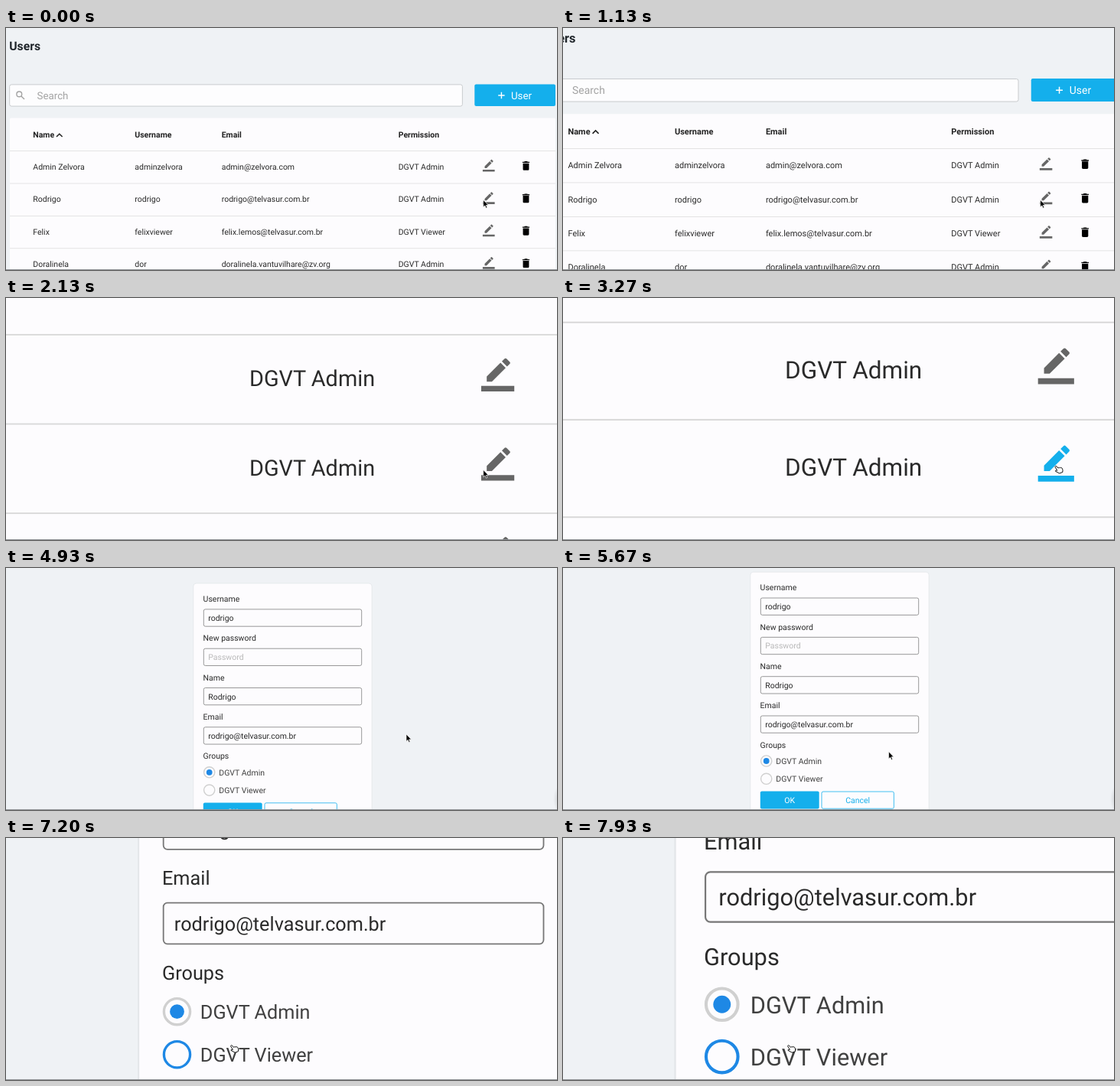
Write an HTML page that moves like this. It is 720 by 316 pixels and loops after 8000 ms.

```html
<!DOCTYPE html>
<html lang="en">
<head>
<meta charset="utf-8">
<title>Edit a user's group</title>
<style>
  html, body { margin: 0; width: 100%; height: 100%; overflow: hidden; background: #eff2f5; }
  svg { display: block; }
  text { font: 10.5px Roboto, sans-serif; fill: #2a2a2a; text-rendering: geometricPrecision; white-space: pre; }
  .title { font-size: 15.75px; font-weight: 700; fill: #20262b; }
  .head { font-weight: 700; fill: #222; }
  .big { font-size: 13.3px; }
  .hint { fill: #a3a3a3; }
  .faint { fill: #b9b9b9; }
  .option { fill: #404040; }
  .mid { text-anchor: middle; }
  .white { fill: #fff; }
  .blue { fill: #14afec; }
  .panel { fill: #fdfcfe; }
  .field { fill: #fdfcfe; stroke: #777; stroke-width: .75; }
  .pen { fill: #666; }
  .hover .pen { fill: #14afec; }
  .ring { fill: #fdfcfe; stroke: #d0d0d0; stroke-width: 1.4; }
  .hover .ring { stroke: #1e88e5; }
</style>
</head>
<body>
<svg id="stage" width="720" height="316">
  <defs>
    <radialGradient id="smudge">
      <stop offset="0" stop-opacity=".16"/>
      <stop offset="1" stop-opacity="0"/>
    </radialGradient>
  </defs>
  <rect width="720" height="316" fill="#eff2f5"/>
  <g id="list"></g>
  <g id="edit">
    <g id="page"></g>
    <ellipse id="corner" cx="724" cy="302" rx="9" ry="18" fill="url(#smudge)"/>
  </g>
  <rect y="315" width="720" height="1" fill="#8f9295"/>
  <g id="arrow">
    <path d="M0 0V9.4L2.1 7.5L3.6 10.8L5.1 10.1L3.7 6.9H6.6Z" fill="#000" stroke="#fff" stroke-width=".7"/>
  </g>
  <g id="hand">
    <path transform="rotate(-20)" d="M-1.1 .8Q0-.5 1 .8L2 3.8Q3 3 3.7 4Q4.8 3.4 5.4 4.6Q6.6 4.2 6.9 5.6L7 8L5.8 10.8H1.4L-2.6 6.4Q-2.6 5.2-1.2 5.7L0 6.3Z"
      fill="#fff" stroke="#111" stroke-width=".9" stroke-linejoin="round"/>
  </g>
</svg>
<script>
const $ = id => document.getElementById(id);
const LOOP = 8000, STEP = 200 / 3;
const ICON = 0.655;

// y is the middle of the capital letters
const text = (x, y, str, cls = '', size = 10.5) =>
  `<text x="${x}" y="${y + size * 0.355}" class="${cls}">${str}</text>`;
const box = (x, y, w, h, r, attrs) =>
  `<rect x="${x}" y="${y}" width="${w}" height="${h}" rx="${r}" ${attrs}/>`;
const icon = (x, y, cls, d) =>
  `<path transform="translate(${x} ${y}) scale(${ICON})" class="${cls}" d="${d}"/>`;

const PEN = 'M17.75 7L14 3.25l-10 10V17h3.75l10-10zm2.96-2.96c.39-.39.39-1.02 0-1.41L18.37.29c-.39-.39-1.02-.39-1.41 0L15 2.25 18.75 6l1.96-1.96zM0 20h24v4H0z';
const BIN = 'M6 19c0 1.1.9 2 2 2h8c1.1 0 2-.9 2-2V7H6v12zM19 4h-3.5l-1-1h-5l-1 1H5v2h14V4z';

const COLUMNS = [35.3, 168.3, 281.7, 512.7];
const ADMIN = 'DGVT Admin', VIEWER = 'DGVT Viewer';
const USERS = [
  ['Admin Zelvora', 'adminzelvora', 'admin@zelvora.com', ADMIN],
  ['Rodrigo', 'rodrigo', 'rodrigo@telvasur.com.br', ADMIN],
  ['Felix', 'felixviewer', 'felix.lemos@telvasur.com.br', VIEWER],
  ['Doralinela', 'dor', 'doralinela.vantuvilhare@zv.org', ADMIN]
];

function userRow(cells, i) {
  const y = i * 42.4;
  return `<g id="row${i}">` +
    box(5, 160.25 + y, 713, 0.7, 0, 'fill="#dadada"') +
    cells.map((cell, c) => text(COLUMNS[c], 181.3 + y, cell)).join('') +
    icon(622.9, 171.8 + y, 'pen', PEN) +
    icon(671.6, 172.1 + y, '', BIN) + '</g>';
}

$('list').innerHTML =
  text(4.2, 23, 'Users', 'title', 15.75) +
  box(4.7, 73.9, 591.7, 28.2, 2.5, 'fill="#fdfdfe" stroke="#bfc2c5" stroke-width=".8"') +
  '<g fill="none" stroke="#a3a3a3" stroke-width="1.4"><circle cx="17.3" cy="86.4" r="3.4"/><path d="M19.9 89L24 93.1"/></g>' +
  text(40.6, 88, 'Search', 'big hint', 13.3) +
  box(612.3, 73.5, 105.7, 28.6, 2, 'class="blue"') +
  '<path d="M643.2 88h8.4M647.4 83.8v8.4" stroke="#fff" stroke-width="1.4"/>' +
  text(660, 88, 'User', 'big white', 13.3) +
  box(5, 117.5, 713, 290, 2, 'class="panel"') +
  ['Name', 'Username', 'Email', 'Permission'].map((h, c) => text(COLUMNS[c], 139, h, 'head')).join('') +
  '<path d="M66 142l3.8-3.8l3.8 3.8" fill="none" stroke="#222" stroke-width="1.5"/>' +
  USERS.map(userRow).join('');

const [name, login, mail] = USERS[1];
const FIELDS = [['Username', login], ['New password', 'Password'], ['Name', name], ['Email', mail]];

const formField = ([label, value], i) => {
  const y = 40.3 + i * 51.3;
  return text(257.6, y, label) +
    box(258.3, y + 13.6, 206.4, 22.3, 2.2, 'class="field"') +
    text(264.2, y + 24.9, value, i === 1 ? 'faint' : '');
};
const radio = (y, label, id) =>
  `<g id="${id}"><circle class="ring" cx="265.7" cy="${y}" r="7.1"/>${text(278.3, y + 0.2, label, 'option')}</g>`;

$('page').innerHTML =
  text(4.2, -34.8, 'Users', 'title', 15.75) +
  box(244.8, 20, 233.4, 330, 4, 'class="panel" stroke="#e3e6e9" stroke-width=".8"') +
  FIELDS.map(formField).join('') +
  text(257.6, 245.7, 'Groups') +
  radio(266.8, ADMIN, 'first') +
  '<circle cx="265.7" cy="266.8" r="3.9" fill="#1e88e5"/>' +
  radio(290.1, VIEWER, 'second') +
  box(257.8, 306.4, 76.9, 23, 2, 'class="blue"') +
  text(296.2, 317.8, 'OK', 'mid white') +
  box(338, 306.8, 94.4, 22.2, 2, 'fill="#fdfcfe" stroke="#14afec" stroke-width=".8"') +
  text(385.2, 317.8, 'Cancel', 'mid blue');

const span = (t, a, b) => Math.min(1, Math.max(0, (t - a) / (b - a)));
const inOut = p => p < 0.5 ? 2 * p * p : 1 - 2 * (1 - p) ** 2;
const out = p => 1 - (1 - p) ** 2;
const show = (el, on) => el.setAttribute('visibility', on ? 'visible' : 'hidden');
const zoom = (el, s, x, y) =>
  el.setAttribute('transform', `matrix(${s} 0 0 ${s} ${x * (1 - s)} ${y * (1 - s)})`);

// start, end, target x and y, upward bow
const MOVES = [
  [2605, 3070, 643.7, 219.3, 0],
  [4067, 4467, 523, 217, 9],
  [5267, 6133, 294.3, 270.5, 0]
];

function pointer(t) {
  let x = 623.7, y = 224.4;
  for (const [a, b, tx, ty, bow] of MOVES) {
    const p = inOut(span(t, a, b));
    x += (tx - x) * p;
    y += (ty - y) * p - bow * Math.sin(Math.PI * p);
  }
  return [x, y];
}

function draw(t) {
  const editing = t >= 3700;
  const onPen = t >= 2720 && !editing;
  const onRadio = t >= 5990;
  show($('list'), !editing);
  show($('edit'), editing);
  show($('corner'), t >= 3900);

  zoom($('list'), 1 + 2 * inOut(span(t, 960, 2525)), 624, 225);
  const grow = 1 - Math.exp(-((Math.max(0, t - 6446) / 662) ** 1.5));
  zoom($('edit'), 1 + 2 * grow, 295.7, 270);
  const scroll = 57.8 - 72.6 * out(span(t, 4670, 5150));
  $('page').setAttribute('transform', `translate(0 ${scroll})`);

  $('row1').classList.toggle('hover', onPen);
  $('second').classList.toggle('hover', onRadio);
  const at = `translate(${pointer(t)})`;
  for (const [id, on] of [['arrow', !onPen && !onRadio], ['hand', onPen || onRadio]]) {
    $(id).setAttribute('transform', at);
    show($(id), on);
  }
}

// The screen refreshes fifteen times a second
function tick() {
  const t = performance.now() % LOOP;
  draw(Math.floor((t + 4) / STEP) * STEP % LOOP);
  requestAnimationFrame(tick);
}
tick();
</script>
</body>
</html>
```
